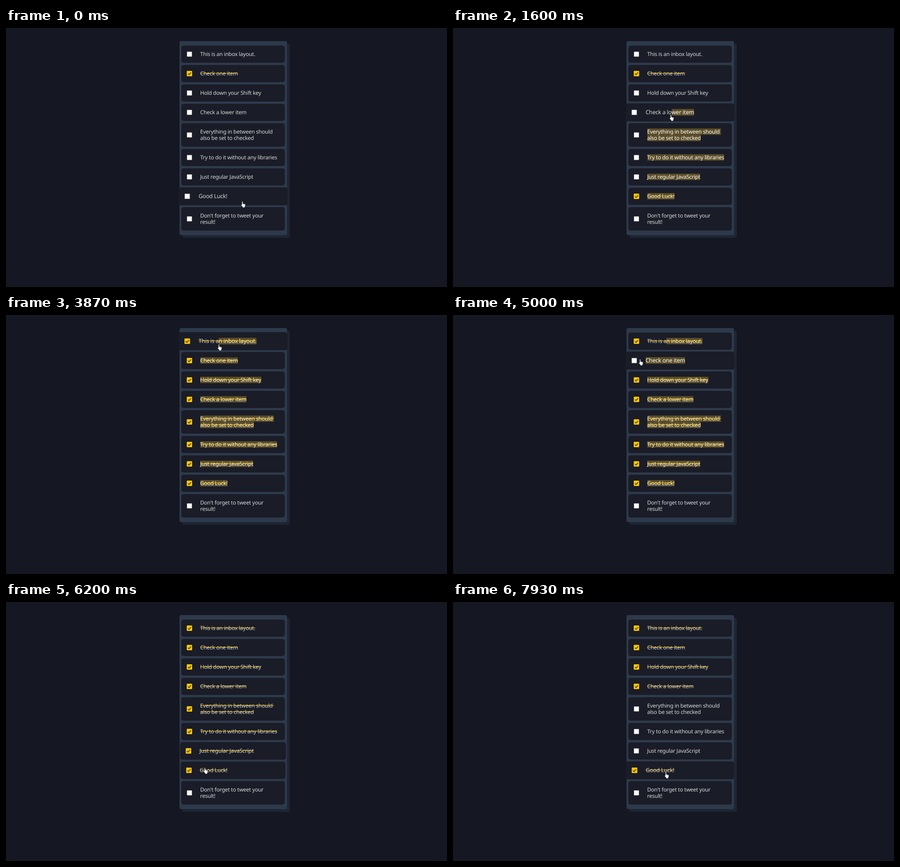
Write an HTML page that moves like this. It is 976 px wide and 574 px high and loops after 8 s.

```html
<!DOCTYPE html>
<html lang="en">
<head>
<meta charset="utf-8">
<title>Inbox checklist</title>
<style>
html, body { margin: 0; width: 100%; height: 100%; overflow: hidden; background: #151722; }
#stage { position: relative; width: 976px; height: 574px; overflow: hidden; }
#panel {
  position: absolute; left: 383.5px; top: 29px; width: 238px; height: 429.5px;
  border-radius: 4px; background: #2d3a4b; box-shadow: 6px 6px 0 #1e2533;
}
.row {
  position: absolute; left: 388px; width: 229px; border-radius: 5px;
  background: #1a1c27; color: #dadadb;
  font: 12px/14.3px "Noto Sans", "Open Sans", sans-serif;
  letter-spacing: -.25px; text-rendering: geometricPrecision;
}
.box { position: absolute; left: 12px; top: 50%; width: 12px; height: 12px; margin-top: -6px; }
.tick { visibility: hidden; }
.text { position: absolute; left: 41.8px; top: 50%; transform: translateY(-50%); white-space: pre; }
.line { height: 14.3px; }
.line span { display: inline-block; height: 14.3px; vertical-align: top; }
.done .tick { visibility: visible; }
.done span { text-decoration: line-through #ffc600 1.3px; }
.line .sel { background: #5c4e28; color: #fff; }
#cursor { position: absolute; left: 0; top: 0; overflow: visible; }
#cursor path { stroke: #15161c; stroke-width: .6; stroke-linejoin: round; }
</style>
</head>
<body>
<div id="stage">
  <div id="panel"></div>
  <svg id="cursor" width="12" height="16">
    <g id="hand" fill="#fff">
      <path d="M-.9 7.4V1a1 1 0 0 1 2 0v3.8l4.2.9q1.4.3 1.3 1.8l-.4 3.2-.9 1.7V14H.8v-1.4l-3.2-3.7q-.7-1 .3-1.5.7-.2 1.2.5z"/>
      <path d="M2.9 5.3v2M4.7 5.7v1.8" fill="none"/>
    </g>
    <path id="arrow" fill="#fff" d="M0 0V9.4l2.1-2 1.5 3.3 1.5-.6-1.5-3.2h2.9z"/>
  </svg>
</div>
<script>
const LOOP = 8000, STEP = 200 / 3, SUB = 20, FADE = 200, MID = 502.5;

// text, centre y, character where the partial selection starts
const items = [
  ["This is an inbox layout.", 58, 9],
  ["Check one item", 101],
  ["Hold down your Shift key", 144],
  ["Check a lower item", 186.9, 10],
  ["Everything in between should \nalso be set to checked", 236.9],
  ["Try to do it without any libraries", 287],
  ["Just regular JavaScript", 329.9],
  ["Good Luck!", 372.9],
  ["Don't forget to tweet your\nresult!", 422.9]
];

// time, then the rows toggled
const clicks = [
  [130, 7], [1800, 3, 4, 5, 6], [3870, 0, 2], [5000, 1], [5270, 1],
  [6800, 4], [7200, 5], [7600, 6]
];

// time, x, y of the pointer
const path = [
  [0, 523, 384], [365, 523, 384], [700, 490, 218], [830, 482, 192],
  [2570, 482, 192], [2730, 482, 198.5], [2960, 482, 198.5], [3200, 476, 80],
  [3350, 471, 65], [4490, 471, 65], [4720, 434, 83], [4870, 414, 98],
  [5430, 414, 98], [6200, 440, 367], [6300, 443, 375], [6680, 458, 245],
  [6820, 460, 243], [6970, 462, 265], [7070, 464, 296], [7300, 466, 303],
  [7550, 468, 312], [7800, 470, 352], [7930, 471, 377], [8000, 471, 377]
];

const $ = id => document.getElementById(id);
const add = (parent, cls, html = "") => {
  const el = document.createElement("div");
  el.className = cls;
  el.innerHTML = html;
  return parent.appendChild(el);
};

const boxArt = `<svg class="box" viewBox="0 0 12 12">
  <rect x=".5" y=".5" width="11" height="11" rx="1.2" fill="#fff" stroke="#7b7b80"/>
  <g class="tick"><rect width="12" height="12" rx="1.8" fill="#ffc600"/>
  <path d="M2.6 6.2 5 8.6 9.6 3.6" fill="none" stroke="#33301f" stroke-width="1.6"/></g></svg>`;

const rows = items.map(([text, y, split = 0]) => {
  const lines = text.split("\n"), h = 23.9 + 14.3 * lines.length;
  const el = add($("stage"), "row", boxArt);
  el.style.cssText = `top:${y - h / 2}px;height:${h}px`;
  add(el, "text", lines.map(s =>
    `<div class="line"><span>${s.slice(0, split)}</span><span>${s.slice(split)}</span></div>`).join(""));
  return { el, y, h, spans: [...el.querySelectorAll("span")] };
});
$("stage").append($("cursor"));

function pointer(t) {
  const i = Math.max(1, path.findIndex(p => p[0] >= t));
  const [t0, x0, y0] = path[i - 1], [t1, x1, y1] = path[i], k = (t - t0) / (t1 - t0);
  return { x: x0 + (x1 - x0) * k, y: y0 + (y1 - y0) * k };
}

// CSS "ease": cubic-bezier(.25, .1, .25, 1)
function ease(x) {
  if (x >= 1) return 1;
  let lo = 0, hi = 1;
  for (let i = 0; i < 16; i++) {
    const s = (lo + hi) / 2, r = 1 - s;
    if (.75 * s * r * r + .75 * s * s * r + s ** 3 < x) lo = s; else hi = s;
  }
  return .3 * lo * (1 - lo) ** 2 + 3 * lo * lo * (1 - lo) + lo ** 3;
}

// Hover growth of every row, run once over the loop
function simulate() {
  const out = [];
  const state = rows.map((_, i) => {
    const v = i === 7 ? 1 : 0;
    return { v, from: v, to: v, start: 0, dur: 1 };
  });
  for (let n = 0; n < LOOP / STEP * SUB; n++) {
    const t = n * STEP / SUB, p = pointer(t);
    let over = false;
    state.forEach((s, i) => {
      const hit = Math.abs(p.y - rows[i].y) < rows[i].h / 2 * (1 + .05 * s.v);
      over = over || hit;
      if (+hit !== s.to) {
        Object.assign(s, { from: s.v, to: +hit, start: t, dur: FADE * Math.abs(hit - s.v) + 1 });
      }
      s.v = s.from + (s.to - s.from) * ease((t - s.start) / s.dur);
    });
    if (n % SUB === 0) out.push({ ...p, over, grow: state.map(s => s.v) });
  }
  return out;
}
const poses = simulate();

function selection(t, i) {
  if (t < 1600 || t >= 5270 || i > 7) return [false, false];
  const first = t < 3670 ? 3 : 0;
  return [i > first, i >= first];
}

function draw(now) {
  // The picture advances 15 times a second
  const n = Math.floor((now % LOOP + 4) / STEP) % poses.length;
  const t = Math.round(n * STEP / 10) * 10, pose = poses[n];
  rows.forEach((row, i) => {
    const flips = clicks.filter(([at, ...who]) => at <= t && who.includes(i)).length;
    const sel = selection(t, i);
    row.el.classList.toggle("done", (flips + (i === 1)) % 2 === 1);
    row.el.style.transform = pose.grow[i] ? `scale(${1 + .05 * pose.grow[i]})` : "none";
    row.spans.forEach((s, j) => s.classList.toggle("sel", sel[j % 2]));
  });
  $("cursor").style.transform = `translate(${pose.x}px,${pose.y}px)`;
  $("hand").style.display = pose.over ? "" : "none";
  $("arrow").style.display = pose.over ? "none" : "";
}

const begin = performance.now();
(function tick() {
  draw(performance.now() - begin);
  requestAnimationFrame(tick);
})();
</script>
</body>
</html>
```
